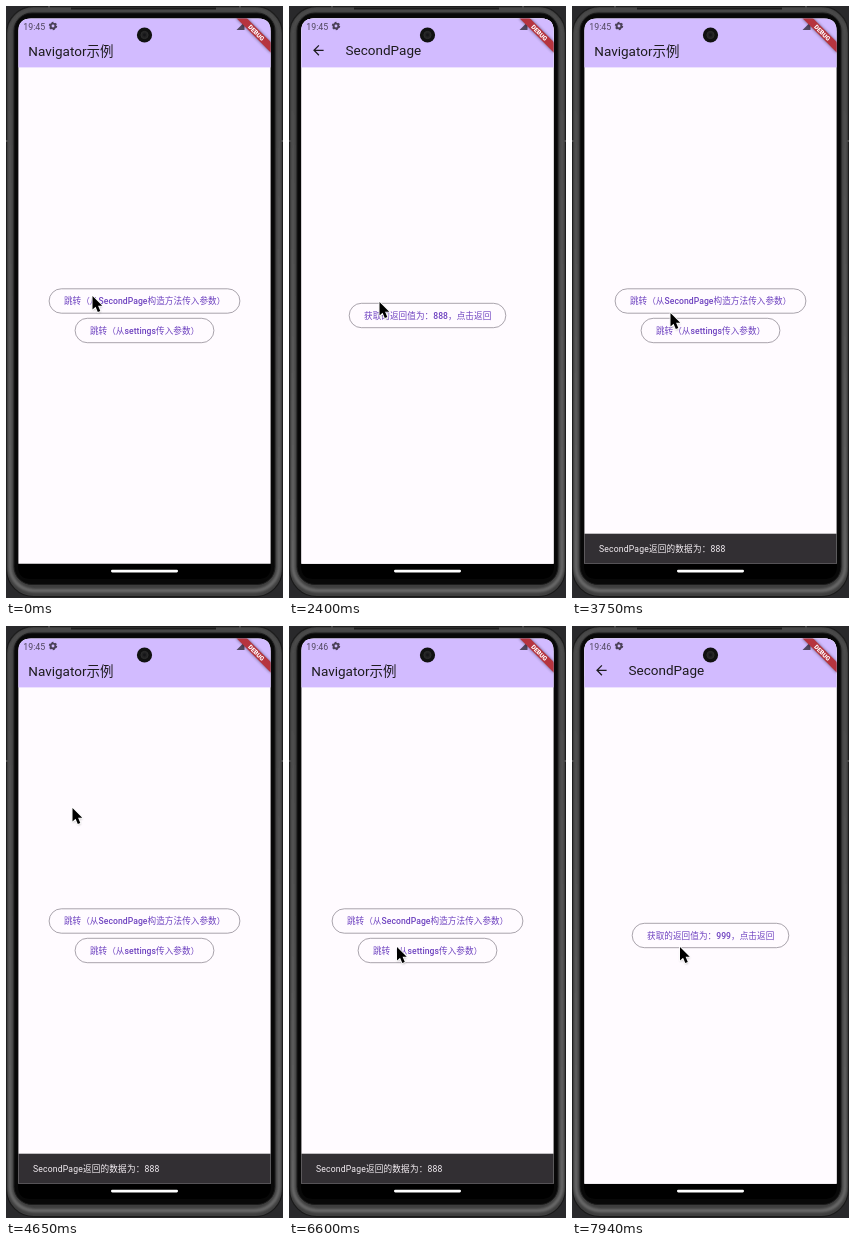
An HTML page for the animation above (8000 ms loop, 277 by 592 pixels).

```html
<!DOCTYPE html>
<html lang="zh-CN">
<head>
<meta charset="utf-8">
<title>Navigator示例</title>
<style>
html, body { margin: 0; width: 100%; height: 100%; overflow: hidden; background: #29292b; }
svg { display: block; width: 277px; height: 592px; }
text { font-family: Roboto, "Noto Sans CJK SC", "Noto Sans CJK", sans-serif; white-space: pre; }
.bar { fill: #d2bbff; }
.page { fill: #fffbff; }
.title { font-size: 13.5px; fill: #1d1b1e; }
.label { font-size: 8.6px; font-weight: 500; letter-spacing: .06px; fill: #6f43c0; }
.pill { fill: none; stroke: #7a757f; stroke-width: .65; }
.tint { fill: #6f43c0; opacity: 0; }
</style>
</head>
<body>
<svg viewBox="0 0 277 592">
  <defs>
    <clipPath id="screen"><path d="M12.4 557.7V25Q12.4 12.4 25 12.4H252Q264.6 12.4 264.6 25V557.7Z"/></clipPath>
    <clipPath id="bannerArea"><path d="M12 12.4H254Q264.6 12.4 264.6 23V100H12Z"/></clipPath>
    <linearGradient id="rim" x2="0" y2="1">
      <stop offset="0" stop-color="#4c4c4c"/><stop offset=".5" stop-color="#585858"/><stop offset="1" stop-color="#6a6a6a"/>
    </linearGradient>
    <filter id="soft" x="-50%" y="-50%" width="200%" height="200%"><feGaussianBlur stdDeviation="1.4"/></filter>
    <filter id="metal"><feGaussianBlur stdDeviation=".8"/></filter>
    <path id="arrow" d="M0 0V14.6L3.3 11.5L5.7 17.1L8.4 16L6 10.5H10.5Z"/>
  </defs>

  <g id="phone">
    <rect width="277" height="592" fill="#29292b"/>
    <rect x=".6" y=".6" width="275.8" height="590" rx="27" fill="#3e3e3e" stroke="#1a1a1a" stroke-width="1.2"/>
    <rect x="4" y="3.6" width="269" height="581" rx="24" fill="none" stroke="url(#rim)" stroke-width="3.4" filter="url(#metal)"/>
    <rect x="8" y="7" width="261" height="571.5" rx="18" fill="#080808" stroke="#1c1c1c"/>
    <path d="M65 2.5H210" stroke="#1c1c1c" stroke-width="2"/>
    <path d="M0 135H3M274 135H277M43 0V3M234 0V3" stroke="#4a4a4a" stroke-width="2"/>
    <path d="M12 557H265V560Q265 573 252 573H25Q12 573 12 560Z"/>
    <rect x="105" y="563.8" width="67" height="2.6" rx="1.3" fill="#fff"/>
  </g>

  <g clip-path="url(#screen)">
    <g id="home">
      <rect class="page" x="12" y="12" width="253" height="546"/>
      <rect class="bar" x="12" y="12" width="253" height="49.4"/>
      <text class="title" x="22.3" y="49.8">Navigator示例</text>
    </g>
    <g id="second">
      <rect class="page" x="12" y="12" width="253" height="546"/>
      <rect class="bar" x="12" y="12" width="253" height="49.4"/>
      <path d="M34.6 44.3H25.4M29.9 39.4L25 44.3L29.9 49.2" fill="none" stroke="#1d1b1e" stroke-width="1.25"/>
      <text class="title" x="56.6" y="48.7">SecondPage</text>
    </g>
    <circle id="ripple" fill="#6f43c0" opacity=".12"/>
    <g id="snack">
      <rect x="12" y="527.7" width="253" height="31" fill="#322f33"/>
      <text x="27" y="546.2" font-size="8.6" letter-spacing=".19" fill="#f5eff4">SecondPage返回的数据为：888</text>
    </g>
  </g>

  <g id="status">
    <text id="clock" x="17.3" y="23.6" font-size="8.8" fill="#51475f">19:45</text>
    <circle cx="47" cy="20" r="2.4" fill="none" stroke="#4b4158" stroke-width="1.9"/>
    <circle cx="47" cy="20" r="3.6" fill="none" stroke="#4b4158" stroke-width="1.2" stroke-dasharray="1.9 1.87"/>
    <path d="M230.5 24L238.5 16V24Z" fill="#51475f"/>
    <g clip-path="url(#bannerArea)">
      <g transform="translate(265 12) rotate(45)">
        <rect x="-24.5" y="17.2" width="49" height="7.4" opacity=".5" filter="url(#soft)"/>
        <rect x="-24.5" y="17.2" width="49" height="7.4" fill="#b6343f"/>
        <text y="23.1" text-anchor="middle" font-size="6.2" font-weight="900" fill="#fff">DEBUG</text>
      </g>
    </g>
    <circle cx="138.5" cy="29" r="7.6" fill="#111"/>
    <circle cx="138.5" cy="29" r="3.6" fill="#222" stroke="#2d2d2d"/>
    <circle cx="138.5" cy="29" r="1.4" fill="#151518"/>
  </g>

  <g id="cursor">
    <use href="#arrow" transform="translate(.9 2.4) scale(.93)" opacity=".3" filter="url(#soft)"/>
    <use href="#arrow" transform="translate(.5 1) scale(.93)" stroke="#fff" stroke-width="1.8" stroke-linejoin="round" paint-order="stroke"/>
  </g>
</svg>
<script>
const LOOP = 8000, CENTER_X = 138.5, CENTER_Y = 285;
const el = id => document.getElementById(id);
const clamp = v => Math.min(1, Math.max(0, v));
const span = (t, from, length) => clamp((t - from) / length);

function svg(parent, tag, attrs) {
  const node = document.createElementNS('http://www.w3.org/2000/svg', tag);
  for (const key in attrs) node.setAttribute(key, attrs[key]);
  return parent.appendChild(node);
}

function addButton(page, y, width, text) {
  const x = CENTER_X - width / 2;
  const box = { x, y: y - 12.2, width, height: 24.4, rx: 12.2 };
  const tint = svg(page, 'rect', { ...box, class: 'tint' });
  svg(page, 'rect', { ...box, class: 'pill' });
  const label = svg(page, 'text', { x: x + 14.8, y: y + 3.1, class: 'label' });
  label.textContent = text;
  return { tint, label };
}

const home = el('home'), second = el('second');
const byConstructor = addButton(home, 295, 190.8, '跳转（从SecondPage构造方法传入参数）');
const bySettings = addButton(home, 324.5, 138.8, '跳转（从settings传入参数）');
const goBack = addButton(second, 309.5, 156.6, '');

// time, x, y of the pointer tip
const path = [
  [0, 86, 289], [2250, 86, 289], [2400, 90, 295], [2700, 98, 306],
  [4200, 98, 306], [4350, 94, 288], [4650, 66, 181], [4800, 62.5, 160], [4950, 62, 152],
  [5100, 62, 152], [5250, 64, 158], [5850, 109, 254], [6150, 107, 314],
  [6300, 108, 320.5], [6450, 108, 320.5], [6600, 107.5, 320], [LOOP, 107.5, 320]
];

function pointerAt(t) {
  const i = path.findIndex(p => p[0] > t);
  const [t0, x0, y0] = path[i - 1], [t1, x1, y1] = path[i];
  const k = (t - t0) / (t1 - t0);
  return [x0 + (x1 - x0) * k, y0 + (y1 - y0) * k];
}

// Emphasized easing: quick start, long settle
const emphasized = u => u < 1 / 6 ? .4 * (u * 6) ** 3 : 1 - .6 * (1 - (u - 1 / 6) * 1.2) ** 4;

const sample = t => {
  const base = t < 7640 ? 0 : 7640;
  return base + Math.floor((t - base) / 150) * 150;
};

function zoom(node, scale, opacity) {
  node.setAttribute('transform',
    `translate(${CENTER_X} ${CENTER_Y}) scale(${scale}) translate(${-CENTER_X} ${-CENTER_Y})`);
  node.setAttribute('opacity', opacity);
}

function showRipple(t, [x, y]) {
  const r = t >= 900 && t < 1350 ? (t < 1050 ? 6 : 10.5)
    : (t >= 3300 && t < 3400) || (t >= 7350 && t < 7450) ? 9 : 0;
  const ripple = el('ripple');
  ripple.setAttribute('cx', x + 1.3);
  ripple.setAttribute('cy', y + .5);
  ripple.setAttribute('r', r);
}

function render(time) {
  const t = sample(time);
  const pop = span(t, 3400, 300), push = span(t, 7450, 300);

  if (t < 1350) {
    zoom(home, 1, 1);
    zoom(second, 1, 0);
  } else if (t < 7450) {
    const p = emphasized(pop);
    zoom(home, pop ? 1.1 - .1 * p : 1, 1);
    zoom(second, 1 - .1 * p, 1 - span(pop, .0825, .125));
  } else {
    const p = emphasized(push);
    zoom(home, 1 + .05 * p, 1);
    zoom(second, .85 + .15 * p, span(push, .125, .125));
  }

  const popping = pop > 0 && pop < 1;
  byConstructor.tint.style.opacity = popping ? .12 * (1 - pop) : 0;
  goBack.tint.style.opacity = popping ? .1 : 0;
  bySettings.tint.style.opacity = push > 0 ? .09 : 0;
  goBack.label.textContent = `获取的返回值为：${t < 5000 ? 888 : 999}，点击返回`;

  const rise = 1 - (1 - span(t, 3450, 250)) ** 3;
  const fall = span(t, 7700, 235) ** 2;
  el('snack').setAttribute('transform', `translate(0 ${31 * (1 - rise + fall)})`);

  el('clock').textContent = t < 5550 ? '19:45' : '19:46';
  const tip = pointerAt(t);
  el('cursor').setAttribute('transform', `translate(${tip})`);
  showRipple(t, tip);
}

const start = performance.now();
function loop() {
  render((performance.now() - start) % LOOP);
  requestAnimationFrame(loop);
}
loop();
</script>
</body>
</html>
```
